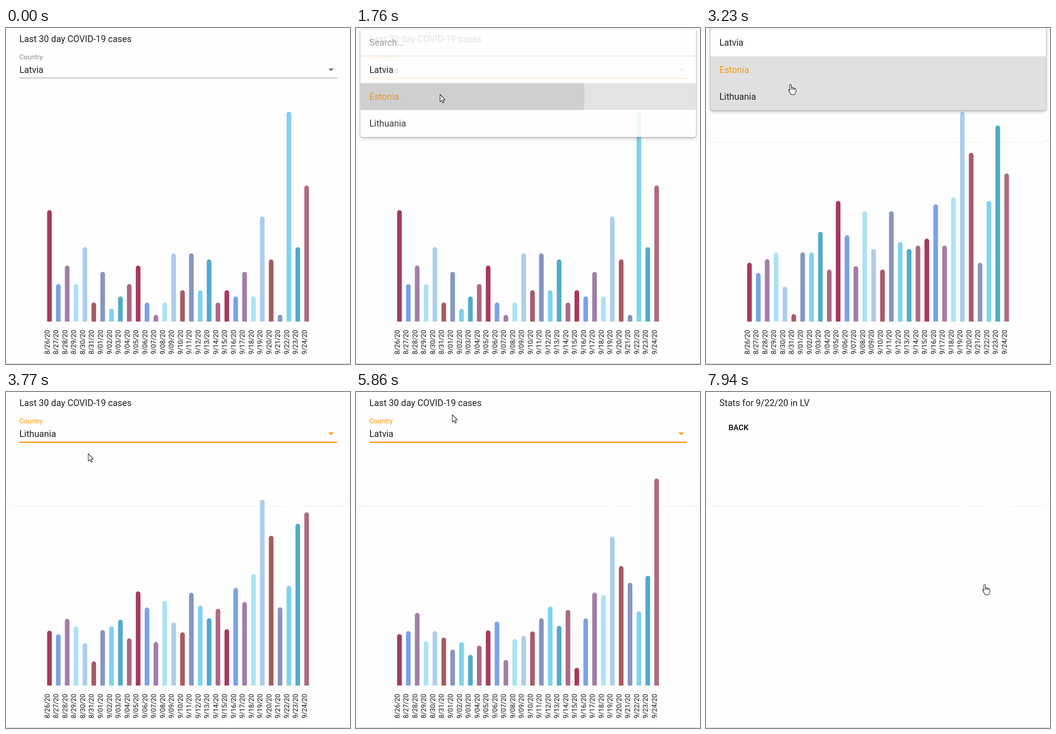
Animation, 757 px wide and 740 px high, one loop 8 s. Source, as an HTML page:

```html
<!DOCTYPE html>
<html lang="en">
<head>
<meta charset="utf-8">
<title>Cases chart</title>
<style>
  html, body { margin: 0; width: 100%; height: 100%; overflow: hidden; background: #fefefe; }
  svg { display: block; width: 757px; height: 740px; font-family: Roboto, sans-serif; }
  text { font-size: 19.7px; fill: #212121; }
  #axis text { font-size: 14.8px; fill: #111; text-anchor: end; }
  #caption { font-size: 14.76px; }
  #back { font-size: 17.2px; font-weight: 500; fill: #000; }
  #sheet { fill: #fff; filter: drop-shadow(0 1px 2px rgba(0,0,0,.28)) drop-shadow(0 3px 4px rgba(0,0,0,.2)); }
  #tip text { fill: #fff; text-anchor: middle; }
  #cursor path { fill: #fff; stroke: #111; stroke-width: 1.1; stroke-linejoin: round; stroke-linecap: round; }
</style>
</head>
<body>
<svg viewBox="0 0 757 740">
  <rect width="757" height="740" fill="#fefefe"/>
  <path id="edge" fill="none" stroke="#f6f6f6" stroke-width="2.6"/>
  <path d="M0 739.5H757" stroke="#c4c4c4"/>
  <text id="title" x="29.5" y="30.7"></text>
  <g id="home">
    <text id="caption" x="29.5" y="69">Country</text>
    <text id="value" x="29.5" y="98.7"></text>
    <path id="arrow" d="M709.5 89H721.5L715.5 95z"/>
    <rect id="line" x="29.5" width="699"/>
    <g id="bars"></g>
    <g id="axis"></g>
    <g id="tip">
      <path d="M581 96H663a4 4 0 0 1 4 4V168a4 4 0 0 1-4 4H628l-6 7-6-7H581a4 4 0 0 1-4-4V100a4 4 0 0 1 4-4z" fill="#000" fill-opacity=".75"/>
      <text x="622" y="128" style="font-size:14.8px">9/22/20</text>
      <text x="622" y="153" style="font-size:19.2px">34</text>
    </g>
  </g>
  <text id="back" x="49.5" y="84">BACK</text>
  <g id="panel">
    <clipPath id="row"><rect id="rowBox" x="10" width="738" height="59.2"/></clipPath>
    <rect id="sheet" x="10" y="3" width="738" height="237" rx="5"/>
    <text x="29.5" y="38.7" style="fill:#949494">Search...</text>
    <path d="M10 61.7H748" stroke="#e0e0e0" stroke-width="1.2"/>
    <g id="options"></g>
    <circle id="ripple" clip-path="url(#row)" fill="#000" fill-opacity=".1"/>
  </g>
  <g id="cursor">
    <path id="pointer" d="M0 0V16.2L3.7 12.8L6.2 18.6L8.7 17.5L6.2 11.8H11.3z"/>
    <g id="hand">
      <path d="M-2 1.6C-2-.6 1.6-.6 1.6 1.6V7.6C2.2 6.4 5 6.6 5 8.4C5.8 7.4 8.2 7.8 8.3 9.4C9.2 8.6 11.8 9 11.8 11.2V15.4C11.8 17.4 10 18.6 10 20.4C9.6 22.6 8 22.8 4.4 22.8C1.4 22.8 .8 22.2-.2 20.2C-1.4 17.6-3.4 15.2-4.2 13.2C-4.8 11.4-3 10.4-2 12z"/>
      <path d="M-2 12V13.4M1.6 7.6V11.8M5 8.4V12M8.3 9.4V12.4" fill="none"/>
    </g>
  </g>
</svg>
<script>
const LOOP = 8000, BASE = 646.5, FULL = 461, ROW = 59.2;
const NS = 'http://www.w3.org/2000/svg';
const $ = id => document.getElementById(id);
const clamp = u => Math.max(0, Math.min(1, u));
const cubic = u => u < .5 ? 4 * u ** 3 : 1 - 4 * (1 - u) ** 3;
const smooth = u => u * u * (3 - 2 * u);
const easeOut = u => 1 - (1 - u) ** 3;

const countries = ['Latvia', 'Estonia', 'Lithuania'];
const cases = [
  [18,6,9,6,12,3,8,2,4,6,9,3,1,3,11,5,11,5,10,3,5,4,8,4,17,10,1,34,12,22],
  [17,14,18,20,10,2,20,20,26,15,35,25,16,32,21,15,32,23,21,22,24,34,22,36,61,49,17,35,57,43],
  [32,36,48,29,35,32,23,29,20,26,36,43,17,31,32,36,44,53,39,51,11,45,62,61,99,80,70,45,73,138]
];
const heights = cases.map(list => list.map(n => n * FULL / Math.max(...list)));
const colors = ['#a8385d', '#7aa3e5', '#a27ea8', '#aae3f5', '#adcded',
                '#a95963', '#8796c0', '#7ed3ed', '#50abcc', '#ad6886'];

// each visit to the country list: opened, pressed, closed, chart starts to change
const picks = [
  { from: 0, to: 1, open: 980, press: 1652, close: 1748, morph: 1770 },
  { from: 1, to: 2, open: 2850, press: 3430, close: 3530, morph: 3538 },
  { from: 2, to: 0, open: 4340, press: 5600, close: 5700, morph: 5755 }
];
const BLUR = 7560, TIP = 7480, LEAVE = 7860;

// time, x, y of the cursor tip
const route = [
  [140, 606, 706], [900, 187, 83], [1300, 187, 83], [1600, 185, 146.5], [1790, 185, 146.5],
  [2200, 190.5, 105], [3080, 190.5, 105], [3400, 181, 147], [3640, 181, 147],
  [3770, 181, 136], [4240, 193, 99], [4790, 193, 99], [4925, 206, -30], [5740, 208, -30],
  [5860, 212, 50], [6320, 300, 200], [7090, 613, 424], [7240, 620, 424], [7680, 620, 424], [7930, 613, 424]
];

function add(parent, tag, attrs, text) {
  const el = document.createElementNS(NS, tag);
  for (const k in attrs) el.setAttribute(k, attrs[k]);
  if (text) el.textContent = text;
  return parent.appendChild(el);
}
const set = (id, attrs) => { for (const k in attrs) $(id).setAttribute(k, attrs[k]); };
const show = (id, on) => { $(id).style.display = on ? '' : 'none'; };

const barX = i => 95.5 + i * 566 / 29;
const bars = heights[0].map((h, i) => {
  const day = i < 6 ? '8/' + (26 + i) : '9/' + String(i - 5).padStart(2, '0');
  add($('axis'), 'text', { transform: `translate(${barX(i) + .4} 665) rotate(-90)` }, day + '/20');
  return add($('bars'), 'path', { fill: colors[i % 10] });
});
const options = countries.map((name, i) => {
  const y = 3 + ROW * (i + 1);
  return {
    bg: add($('options'), 'rect', { x: 10, y, width: 738, height: ROW, fill: '#000' }),
    label: add($('options'), 'text', { x: 29.5, y: y + 36.5 }, name)
  };
});

function cursorAt(t) {
  let i = 0;
  while (i < route.length - 2 && t >= route[i + 1][0]) i++;
  const [t0, x0, y0] = route[i], [t1, x1, y1] = route[i + 1];
  const u = smooth(clamp((t - t0) / (t1 - t0)));
  return { x: x0 + (x1 - x0) * u, y: y0 + (y1 - y0) * u };
}

function drawPanel(t, pick, tip) {
  const visible = pick && t < pick.close + 100;
  show('panel', visible);
  if (!visible) return;
  const grow = easeOut(clamp((t - pick.open) / 130));
  const s = .8 + .2 * grow, off = -ROW * pick.from;
  set('panel', {
    transform: `translate(0 ${92 * (1 - s) + off * s}) scale(1 ${s})`,
    opacity: grow * (1 - clamp((t - pick.close) / 100))
  });
  const closing = t >= pick.close;
  const chosen = closing ? pick.to : pick.from;
  const active = closing ? pick.to : Math.floor((tip.y - off - 3) / ROW) - 1;
  options.forEach((o, i) => {
    o.bg.setAttribute('fill-opacity', i === chosen || i === active ? .12 : 0);
    o.label.style.fill = i === chosen ? '#f39a1d' : '#212121';
  });
  set('rowBox', { y: 3 + ROW * (pick.to + 1) });
  set('ripple', {
    cx: 185, cy: 3 + ROW * (pick.to + 1) + 25,
    r: 563 * easeOut(clamp((t - pick.press) / 450))
  });
}

function drawField(t, country) {
  const focus = t >= picks[0].open && t < BLUR;
  const u = focus ? easeOut(clamp((t - picks[0].open) / 150)) : 0;
  $('value').textContent = countries[country];
  $('caption').style.fill = focus ? '#ff9800' : '#8c8c8c';
  set('arrow', { fill: focus ? '#ff9800' : '#757575' });
  set('line', { y: 109.4, height: 1.2 + 1.5 * u, fill: focus ? '#ff9800' : '#949494' });
}

// returns whether a bar lies under the cursor
function drawBars(t, tip, free) {
  const step = picks.filter(p => t >= p.morph).pop();
  const u = step ? cubic(clamp((t - step.morph) / 500)) : 0;
  const from = heights[step ? step.from : 0], to = heights[step ? step.to : 0];
  let hit = false;
  bars.forEach((bar, i) => {
    const h = from[i] + (to[i] - from[i]) * u, x = barX(i) - 5;
    const over = free && Math.abs(tip.x - x - 5) < 5.2 && tip.y < BASE && tip.y > BASE - h;
    hit = hit || over;
    bar.setAttribute('d', `M${x} ${BASE}V${BASE - h + 4}a5 5 0 0 1 10.2 0V${BASE}z`);
    bar.setAttribute('opacity', over ? .8 : 1);
  });
  return hit;
}

function draw(t) {
  const tip = cursorAt(t);
  const pick = picks.filter(p => t >= p.open).pop();
  const listOpen = pick && t < pick.close;
  const country = pick ? (listOpen ? pick.from : pick.to) : 0;
  const away = t >= LEAVE;

  $('title').textContent = away ? 'Stats for 9/22/20 in LV' : 'Last 30 day COVID-19 cases';
  show('home', !away);
  show('back', away);
  drawField(t, country);
  drawPanel(t, pick, tip);
  const onBar = drawBars(t, tip, t >= 140 && !listOpen);

  show('edge', t >= picks[0].close + 100);
  const top = t < picks[1].open ? 0 : 185, gap = t > 4100 ? 'H656M667 251.5' : '';
  set('edge', { d: `M1 ${top}V234q0 17.5 17 17.5H558M569 251.5H617M628 251.5H637M648 251.5${gap}H739q17 0 17-17.5V${top}` });

  show('tip', t >= TIP);
  set('tip', { opacity: clamp((t - TIP) / 100) });

  const onField = tip.y > 60 && tip.y < 118 && tip.x > 29 && tip.x < 728;
  const hand = listOpen || onField || onBar || away;
  show('cursor', t >= 140);
  set('cursor', { transform: `translate(${tip.x} ${tip.y})` });
  show('hand', hand);
  show('pointer', !hand);
}

function frame() {
  draw(performance.now() % LOOP);
  requestAnimationFrame(frame);
}
frame();
</script>
</body>
</html>
```
